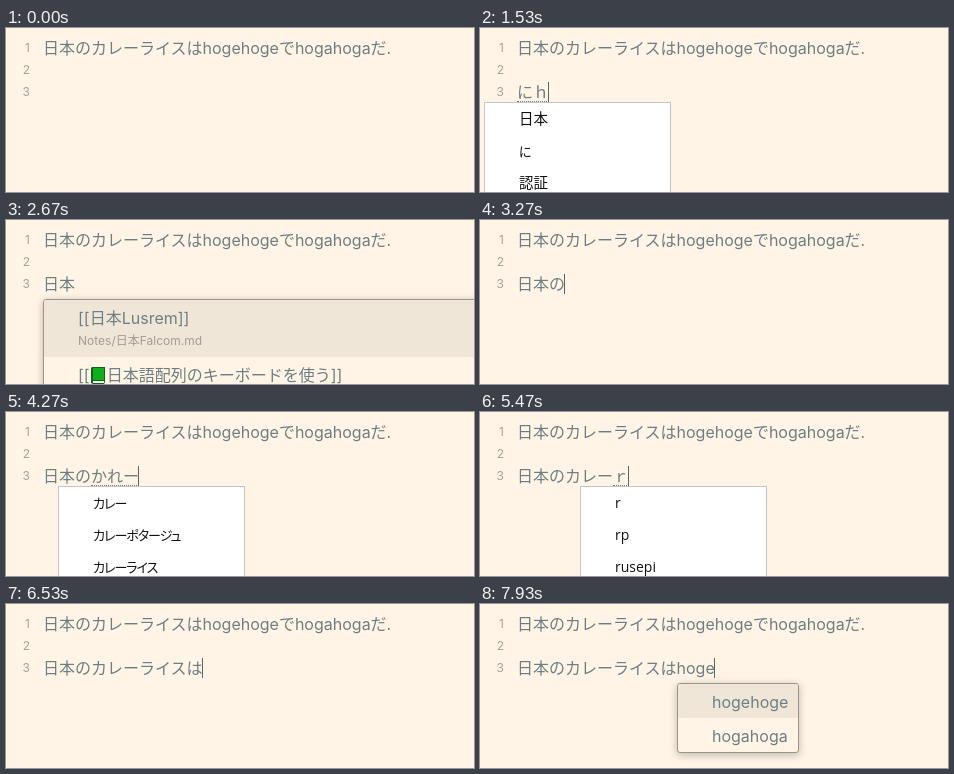
These frames come from a looping animation (468 by 164 pixels, 8 s). An HTML page:

```html
<!DOCTYPE html>
<html lang="ja">
<head>
<meta charset="utf-8">
<title>Japanese input with completion</title>
<style>
  html, body { margin: 0; width: 100%; height: 100%; overflow: hidden; background: #fff4e5; }
  body {
    position: relative;
    font: 16px/22px Inter, "Noto Sans CJK JP Light", "Noto Sans CJK JP", sans-serif;
    color: #6c7f82; white-space: pre;
  }
  .line, .number, #ime, .suggest { position: absolute; box-sizing: border-box; }
  .line { left: 37px; height: 22px; }
  .number { left: 0; width: 24px; font-size: 12px; text-align: right; color: #a5a29c; }
  #composing {
    display: inline-block; box-sizing: border-box; height: 21px;
    vertical-align: top; border-bottom: 1px dotted #6c7f82;
  }
  #composing.converted { border-bottom: 2px solid #6c7f82; }
  #composing:empty { border: 0; }
  #caret {
    display: inline-block; width: 1px; height: 20px; margin: 1px 0 0 -1px;
    vertical-align: top; background: #566;
  }
  #ime {
    top: 74px; min-width: 187px; height: 120px; padding: 0 16px 0 34px;
    background: #fff; border: 1px solid #c4c4c4; color: #111;
    font: 14px/32px "Open Sans", "Noto Sans CJK JP", sans-serif;
  }
  #ime div { height: 32px; }
  #ime .kanji { font-size: 14.5px; }
  #ime .kana { font-size: 13px; font-feature-settings: "palt"; letter-spacing: -1px; }
  .suggest {
    top: 79px; overflow: hidden; background: #fff4e5;
    border: 1px solid #98948e; border-radius: 3px; box-shadow: 0 2px 8px rgba(0, 0, 0, .25);
  }
  .suggest div { box-sizing: border-box; padding: 7px 0 0 34px; }
  .suggest div:first-child { background: #efe6d8; }
  .suggest small { display: block; margin-top: 3px; font-size: 12px; line-height: 18px; color: #a39d94; }
  #notes { left: 37px; width: 470px; height: 120px; }
  #notes div { height: 57px; }
  #words { left: 197px; width: 122px; height: 70px; }
  #words div { height: 34px; }
  svg { width: 17px; height: 18px; vertical-align: -4px; }
  [hidden] { display: none !important; }
</style>
</head>
<body><div class="number" style="top:9px">1</div><div class="number" style="top:31px">2</div><div class="number" style="top:53px">3</div><div class="line" style="top:9px">日本のカレーライスはhogehogeでhogahogaだ.</div><div class="line" style="top:53px"><span id="committed"></span><span id="composing"></span><span id="caret"></span></div><div id="ime" hidden></div><div id="notes" class="suggest" hidden><div>[[日本Lusrem]]<small>Notes/日本Falcom.md</small></div><div>[[<svg viewBox="0 0 17 18"><path d="M1 1l1-1h13v15l-1 2H3l-2-1z" fill="#165c1c"/><path d="M3 1h11v12H3z" fill="#0fae1c"/><path d="M3 14h11v2H3z" fill="#f4f4ee"/></svg>日本語配列のキーボードを使う]]</div></div><div id="words" class="suggest" hidden><div>hogehoge</div><div>hogahoga</div></div>
<script>
const LOOP = 8000;
const $ = id => document.getElementById(id);

const candidates = {
  ni: ['日本', 'に', '認証'],
  niho: ['日本', '日本語', '日本語配列のキーボード'],
  no: ['の', 'ノート', 'のみ'],
  ka: ['カレー', 'か', '確認'],
  kare: ['カレー', 'カレーポタージュ', 'カレーライス'],
  r: ['r', 'rp', 'rusepi'],
  ra: ['ライス', 'ライブラリ', 'ら'],
  ha: ['は', 'はい', 'ハヤシライス'],
};

// [start ms, committed text, composing text, popup, flag: "off" hides the caret, "converted" thickens the underline]
const curry = '日本のカレー', rice = curry + 'ライス', full = rice + 'は';
const steps = [
  [0, '', '', '', 'off'],
  [200, '', ''],
  [800, '', '', '', 'off'],
  [1270, '', ''],
  [1330, '', 'n'],
  [1400, '', 'に'],
  [1470, '', 'に', 'ni'],
  [1530, '', 'にh', 'ni'],
  [1600, '', 'にほ', 'ni'],
  [1670, '', 'にほ', 'niho'],
  [1730, '', 'にほn', 'niho'],
  [1870, '', 'にほん', 'niho'],
  [2000, '', '日本', '', 'converted'],
  [2130, '日本', ''],
  [2270, '日本', '', 'notes'],
  [2670, '日本', '', 'notes', 'off'],
  [3000, '日本', 'n'],
  [3130, '日本', 'の', 'no'],
  [3270, '日本の', ''],
  [3670, '日本の', 'k'],
  [3800, '日本の', 'か', 'ka'],
  [3930, '日本の', 'かr', 'ka'],
  [4000, '日本の', 'かれ', 'ka'],
  [4070, '日本の', 'かれ', 'kare'],
  [4200, '日本の', 'かれー', 'kare'],
  [4400, '日本の', 'カレー', '', 'converted'],
  [4670, curry, ''],
  [5000, curry, '', '', 'off'],
  [5470, curry, 'r', 'r'],
  [5530, curry, 'ら', 'r'],
  [5600, curry, 'らい', 'ra'],
  [5670, curry, 'らいs', 'ra'],
  [5800, curry, 'らいす', 'ra'],
  [6000, curry, 'ライス', '', 'converted'],
  [6130, rice, ''],
  [6330, rice, 'h'],
  [6400, rice, 'は', 'ha'],
  [6530, full, ''],
  [7000, full, '', '', 'off'],
  [7600, full + 'h', ''],
  [7670, full + 'ho', ''],
  [7800, full + 'hog', '', 'words'],
  [7870, full + 'hoge', '', 'words'],
];

// Letters still being composed are shown in their full-width forms.
const fullWidth = text => text.replace(/[a-z]/g, c => String.fromCharCode(c.charCodeAt(0) + 0xfee0));

function styleOf(text) {
  if (/^[ぁ-ヿ]+$/.test(text)) return 'kana';
  return /^[a-z]+$/.test(text) ? 'latin' : 'kanji';
}

function show([, committed, composing, popup = '', flag = '']) {
  $('committed').textContent = committed;
  $('composing').textContent = fullWidth(composing);
  $('composing').className = flag;
  $('caret').style.visibility = flag === 'off' ? 'hidden' : 'visible';
  $('notes').hidden = popup !== 'notes';
  $('words').hidden = popup !== 'words';

  const list = candidates[popup];
  $('ime').hidden = !list;
  if (list) {
    $('ime').innerHTML = list.map(text => `<div class="${styleOf(text)}">${text}</div>`).join('');
    $('ime').style.left = 4 + committed.length * 16 + 'px';
  }
}

let current;
function tick() {
  const time = performance.now() % LOOP;
  const step = steps.findLast(([start]) => start <= time);
  if (step !== current) show(current = step);
  requestAnimationFrame(tick);
}
tick();
</script>
</body>
</html>
```
